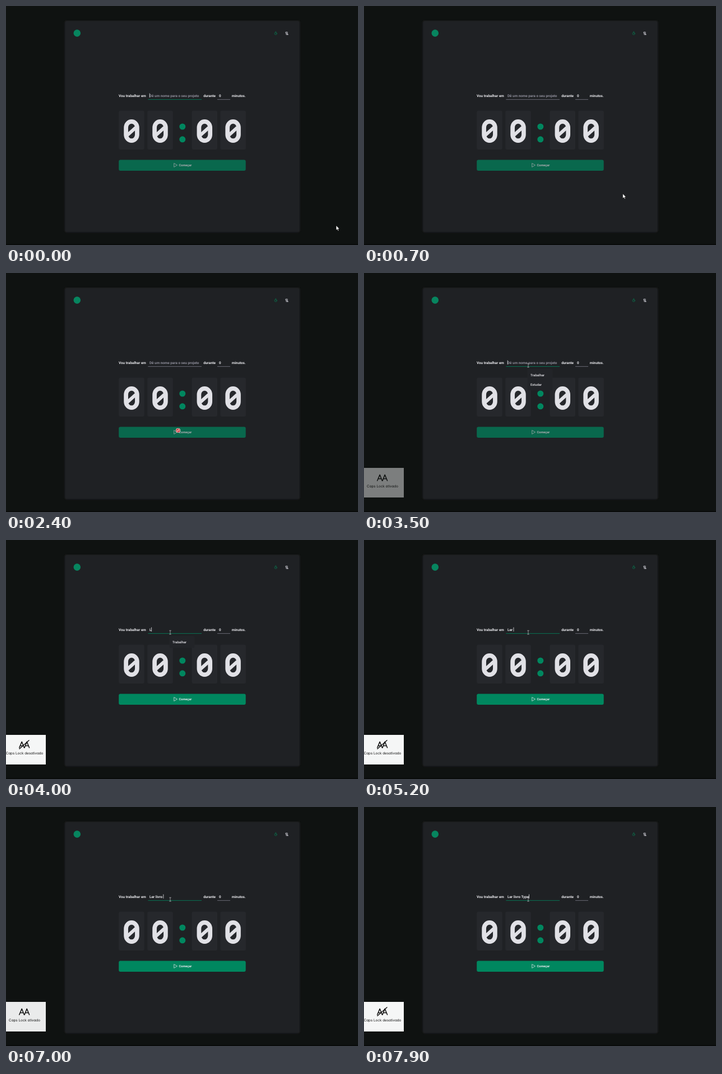
An HTML page that plays this animation: 628x428 px, repeating every 8 s.

```html
<!DOCTYPE html>
<html lang="pt-BR">
<head>
<meta charset="utf-8">
<title>Timer</title>
<style>
  html, body { margin: 0; width: 100%; height: 100%; overflow: hidden; background: #0f1211; }
  svg { display: block; width: 628px; height: 428px; }
  text { font: 700 6.34px Roboto, sans-serif; fill: #e8e8ec; white-space: pre; text-rendering: geometricPrecision; }
  .button text { font-size: 5.66px; }
  .option { font-size: 5.85px; font-weight: 500; }
  .hint { fill: #8d8d99; }
  .caps text { font: 400 6.3px Inter, sans-serif; font-feature-settings: "cv11"; fill: #151515; text-anchor: middle; }
  .line { stroke: #7c7c8a; stroke-width: .8; }
  .line.focus { stroke: #00875f; }
  .stroke { fill: none; stroke-linecap: round; stroke-linejoin: round; }
</style>
</head>
<body>
<svg viewBox="0 0 628 428">
  <defs>
    <filter id="soft" x="-10%" y="-10%" width="120%" height="120%"><feGaussianBlur stdDeviation="1.6"/></filter>
    <g id="digit">
      <rect x="-22.8" y="-36.5" width="45.6" height="69.5" rx="3" fill="#26282c"/>
      <rect x="-9.9" y="-17.2" width="19.8" height="34.4" rx="9.9" ry="11" fill="none" stroke="#e1e1e6" stroke-width="7.7"/>
      <path d="M-7.5 7.3L7.5-6.3" stroke="#e1e1e6" stroke-width="6"/>
    </g>
    <path id="letters" class="stroke" stroke="#111" stroke-width="1.5"
      d="M23.7 372L28.2 361.4L32.4 372M25.2 368.6H31M33 372L37.2 361.4L41.6 372M34.3 368.6H40.2"/>
  </defs>

  <rect width="628" height="428" fill="#0f1211"/>
  <rect y="426" width="628" height="2" fill="#090b0a"/>
  <rect x="104.5" y="26" width="420" height="379.5" rx="4" fill="#1a1c1e" filter="url(#soft)"/>
  <rect x="105.5" y="27" width="418" height="377.5" rx="3" fill="#1f2124"/>

  <circle cx="126.8" cy="48.6" r="6.3" fill="#07855f"/>
  <g class="stroke" stroke="#08754f" stroke-width=".75">
    <circle cx="481.2" cy="49.4" r="2.1"/>
    <path d="M480.4 46.2H482M481.2 49.4L482.2 48.4"/>
  </g>
  <path class="stroke" stroke="#c4c4cc" stroke-width=".75"
    d="M498.7 48V47.3Q498.7 46.6 499.4 46.6H502.2V50.6M499.6 46.8V50.6Q499.6 51.5 500.5 51.5H503.3V50.7H500.8M500.6 48.3H501.6M500.6 49.5H501.6"/>

  <text x="201" y="163">Vou trabalhar em</text>
  <text x="352.2" y="163">durante</text>
  <text x="380" y="162.6">0</text>
  <text x="402.7" y="163">minutos.</text>
  <path id="nameLine" class="line" d="M253.4 167.4H349"/>
  <path class="line" d="M377 167.4H400"/>
  <text id="hint" class="hint" x="256" y="162.6">Dê um nome para o seu projeto</text>
  <text id="name" x="256" y="162.6"></text>
  <rect id="caret" y="156.4" width=".8" height="7.4" fill="#e8e8ec"/>

  <use href="#digit" x="224" y="224"/>
  <use href="#digit" x="275" y="224"/>
  <use href="#digit" x="354.3" y="224"/>
  <use href="#digit" x="405.1" y="224"/>
  <circle cx="314.8" cy="216" r="5.5" fill="#00875f"/>
  <circle cx="314.8" cy="238.8" r="5.5" fill="#00875f"/>

  <g id="button" class="button">
    <rect x="201.2" y="275.4" width="226.5" height="19.6" rx="3" fill="#00875f"/>
    <path class="stroke" stroke="#e1e1e6" stroke-width=".75" d="M299.7 282V288.4L305.2 285.2Z"/>
    <text x="308.5" y="287.1">Começar</text>
  </g>

  <g id="list">
    <rect id="listBox" x="291.5" y="172" width="45" rx="2" fill="#222428"/>
    <text class="option" x="297" y="184.7">Trabalhar</text>
    <text id="study" class="option" x="297" y="201.7">Estudar</text>
  </g>

  <g id="caps" class="caps">
    <rect y="349" width="71" height="53" fill="#f5f6f6"/>
    <use href="#letters"/>
    <path id="slash" d="M24 374L41 358.8" class="stroke" stroke="#111" stroke-width="1.4"/>
    <text id="capsText" x="33" y="384"></text>
  </g>

  <g id="arrow">
    <path d="M0 0V8.6L2 6.8L3.4 9.8L4.8 9.2L3.5 6.3H6Z" fill="#fff" stroke="#000" stroke-width=".6"/>
  </g>
  <g id="denied">
    <circle r="4.1" fill="#fff"/>
    <circle r="2.8" fill="none" stroke="#c8282d" stroke-width="1.4"/>
    <path d="M-2-2L2 2" stroke="#c8282d" stroke-width="1.4"/>
  </g>
  <g id="beam">
    <path class="stroke" stroke="#b4b4b8" stroke-width=".75" d="M-1.4-3.3H1.4M0-3.3V3.3M-1.4 3.3H1.4"/>
  </g>
</svg>
<script>
const LOOP = 8000, STEP = 100;
const el = id => document.getElementById(id);
const show = (id, on) => el(id).setAttribute("visibility", on ? "visible" : "hidden");
const fade = (id, a) => el(id).setAttribute("opacity", a);
const clamp = v => Math.max(0, Math.min(1, v));

// time, x, y
const path = [
  [0, 589, 393], [200, 600, 397], [400, 560, 372], [900, 396, 312],
  [1500, 328, 289], [1800, 325, 286], [2100, 338, 286], [2400, 307, 282],
  [2500, 306, 281], [2700, 308, 188], [3100, 293, 165.5], [LOOP, 293, 165.5]
];
// time, letters typed so far
const phrase = "Ler livro Type";
const keys = [
  [3800, 1], [4200, 2], [4900, 3], [5200, 4], [5500, 6], [5600, 7], [5900, 8],
  [6000, 9], [6400, 10], [7100, 11], [7300, 12], [7700, 13], [7900, 14]
];

function pointer(t) {
  const i = path.findIndex(p => p[0] > t);
  const [t0, x0, y0] = path[i - 1], [t1, x1, y1] = path[i];
  const k = (t - t0) / (t1 - t0);
  return [x0 + (x1 - x0) * k, y0 + (y1 - y0) * k];
}

function drawPointer(t) {
  const [x, y] = pointer(t);
  const inside = (l, r, top, bottom) => x > l && x < r && y > top && y < bottom;
  const kind = inside(201, 428, 275, 295) ? "denied" : inside(253, 349, 154, 169) ? "beam" : "arrow";
  for (const id of ["arrow", "denied", "beam"]) show(id, id === kind);
  el(kind).setAttribute("transform", `translate(${x} ${y})`);
}

function drawField(t) {
  const count = keys.reduce((n, [at, len]) => t >= at ? len : n, 0);
  const focus = t < 500 || t >= 3200;
  el("name").textContent = phrase.slice(0, count);
  const width = count ? el("name").getComputedTextLength() : 0;
  el("caret").setAttribute("x", 255.8 + width);
  show("caret", focus);
  show("hint", !count);
  el("nameLine").classList.toggle("focus", focus);
  fade("button", count ? 1 : 0.7);
  show("study", !count);
  el("listBox").setAttribute("height", count ? 21 : 38);
  fade("list", t < 3300 ? 0 : clamp((4500 - t) / 400));
}

function drawCaps(t) {
  const first = Math.min(clamp((t - 3400) / 210), clamp((6000 - t) / 200));
  const second = clamp((t - 6800) / 210);
  const on = t < 4000 || (t >= 6900 && t < 7300);
  fade("caps", Math.max(first, second));
  show("slash", !on);
  el("capsText").textContent = on ? "Caps Lock ativado" : "Caps Lock desativado";
}

function frame() {
  const t = Math.floor(performance.now() % LOOP / STEP) * STEP;
  drawPointer(t);
  drawField(t);
  drawCaps(t);
  requestAnimationFrame(frame);
}
frame();
</script>
</body>
</html>
```
